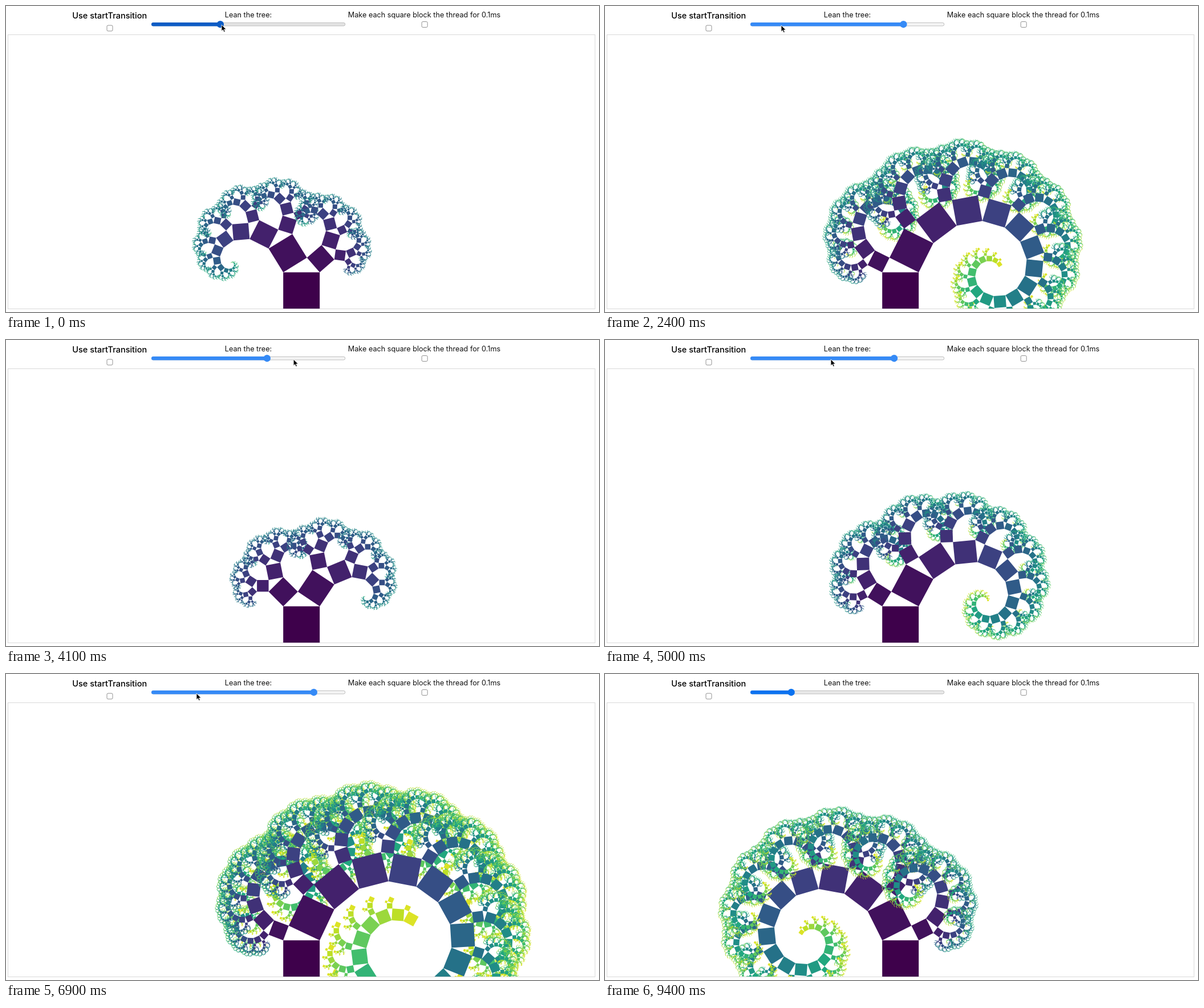
These frames come from a looping animation (1040x538 px, 9500 ms). An HTML page with a canvas:

```html
<!DOCTYPE html>
<html lang="en">
<head>
<meta charset="utf-8">
<title>Leaning tree</title>
<style>
  html, body { margin: 0; width: 100%; height: 100%; overflow: hidden; background: #fff; }
  canvas, svg { position: absolute; left: 0; top: 0; width: 1040px; height: 538px; display: block; }
  text { font-family: Inter, Roboto, sans-serif; font-size: 12.65px; fill: #111; text-anchor: middle; }
  .title { font-size: 14.5px; font-weight: 500; fill: #000; }
  .box { fill: #fff; stroke: #767676; stroke-width: .8; }
</style>
</head>
<body>
<canvas id="tree"></canvas>
<svg viewBox="0 0 1040 538">
  <rect x="3.5" y="50.5" width="1029.5" height="482" fill="none" stroke="#d9d9d9"/>
  <text class="title" x="181.7" y="22">Use startTransition</text>
  <text x="425" y="20">Lean the tree:</text>
  <text x="733.5" y="20">Make each square block the thread for 0.1ms</text>
  <rect class="box" x="177" y="34" width="10" height="10" rx="2"/>
  <rect class="box" x="729.2" y="27.5" width="10" height="10" rx="2"/>
  <rect id="track" x="255.4" y="29.4" width="339.4" height="5.6" rx="2.8" stroke="#b2b2b2" stroke-width=".8"/>
  <rect id="fill" x="255" y="29" height="6.4" rx="3.2"/>
  <circle id="thumb" cy="32.2" r="6.2"/>
  <path id="cursor" d="M0 0V11.2L2.6 8.8 4.3 12.8 6.3 12 4.6 8.1H8.2Z" fill="#000" stroke="#fff" stroke-width=".8"/>
</svg>
<script>
const LOOP = 9500, STEP = 100;
const MAX_LEVEL = 20, HEIGHT = 0.4, MIN_SIDE = 0.8;

// [time, lean]: the tree and slider jump when a render finishes
const leans = [
  [0, -.15], [400, -.1], [600, -.05], [800, 0], [1000, .05], [1200, .15], [1500, .25],
  [2100, .3], [2700, -.15], [2900, -.3], [3100, -.35], [3900, .05], [4100, .1], [4300, .2],
  [4500, .25], [5200, 0], [5400, -.3], [5800, .15], [6000, .35], [6400, -.25], [6700, .35],
  [7300, 0], [7500, -.3], [8000, .1], [8400, -.1], [8700, -.25], [9200, -.3]
];
// [time, x]: pointer turning points
const pointer = [
  [0, 378], [300, 380], [1000, 486], [1400, 525], [2000, 347], [2400, 309], [2900, 306],
  [3700, 449], [4200, 510], [5000, 396], [5500, 325], [6200, 541], [6900, 334],
  [7200, 318], [7900, 440], [8500, 340], [9200, 322]
];
const looks = [
  { from: 0, blue: "#0d5cc5", grey: "#e3e3e3" },
  { from: 300, blue: "#358af6", grey: "#f4f4f4" },
  { from: 9200, blue: "#0b72f0", grey: "#e8e8e8" }
];

const viridis = [
  [62, 1, 75], [67, 33, 108], [60, 65, 129], [48, 91, 136], [37, 113, 136], [32, 141, 135],
  [34, 167, 127], [66, 190, 109], [122, 209, 81], [189, 223, 38], [250, 231, 37]
];
const shades = Array.from({ length: MAX_LEVEL }, (_, level) => {
  const p = level / MAX_LEVEL * 10, i = Math.floor(p);
  const mix = viridis[i].map((c, k) => Math.round(c + (viridis[i + 1][k] - c) * (p - i)));
  return `rgb(${mix})`;
});

const $ = id => document.getElementById(id);
const canvas = $("tree"), ctx = canvas.getContext("2d");
const ratio = window.devicePixelRatio || 1;
canvas.width = 1040 * ratio;
canvas.height = 538 * ratio;
ctx.scale(ratio, ratio);
ctx.beginPath();
ctx.rect(4, 51, 1028.5, 481.4);
ctx.clip();

// (x, y) is the lower left corner, (ux, uy) the base edge
function branch(x, y, ux, uy, level, lean) {
  if (level >= MAX_LEVEL || Math.hypot(ux, uy) < MIN_SIDE) return;
  const vx = uy, vy = -ux;
  const qx = x + vx, qy = y + vy;
  ctx.fillStyle = shades[level];
  ctx.beginPath();
  ctx.moveTo(x, y);
  ctx.lineTo(x + ux, y + uy);
  ctx.lineTo(qx + ux, qy + uy);
  ctx.lineTo(qx, qy);
  ctx.fill();
  const ax = (.5 - lean) * ux + HEIGHT * vx;
  const ay = (.5 - lean) * uy + HEIGHT * vy;
  branch(qx, qy, ax, ay, level + 1, lean);
  branch(qx + ax, qy + ay, ux - ax, uy - ay, level + 1, lean);
}

function drawTree(lean) {
  ctx.clearRect(0, 0, 1040, 538);
  branch(486.2, 532.2, 64, 0, 0, lean);
}

function pointerX(t) {
  const i = pointer.findIndex(p => p[0] > t);
  if (i < 0) return pointer[pointer.length - 1][1];
  const [t0, x0] = pointer[i - 1], [t1, x1] = pointer[i];
  return x0 + (x1 - x0) * (1 - Math.cos(Math.PI * (t - t0) / (t1 - t0))) / 2;
}

function set(id, attrs) {
  for (const key in attrs) $(id).setAttribute(key, attrs[key]);
}

let shownLean = null;
function render(time) {
  const t = Math.floor(time % LOOP / STEP) * STEP;
  const lean = leans.findLast(k => k[0] <= t)[1];
  const look = looks.findLast(k => k.from <= t);
  if (lean !== shownLean) drawTree(shownLean = lean);
  const x = 425 + lean * 328;
  set("track", { fill: look.grey });
  set("fill", { width: x - 255, fill: look.blue });
  set("thumb", { cx: x, fill: look.blue });
  set("cursor", {
    transform: `translate(${pointerX(t)} ${t < 300 ? 33 : 34})`,
    visibility: t < 9200 ? "visible" : "hidden"
  });
}

const start = performance.now();
function tick() {
  render(performance.now() - start);
  requestAnimationFrame(tick);
}
tick();
</script>
</body>
</html>
```
